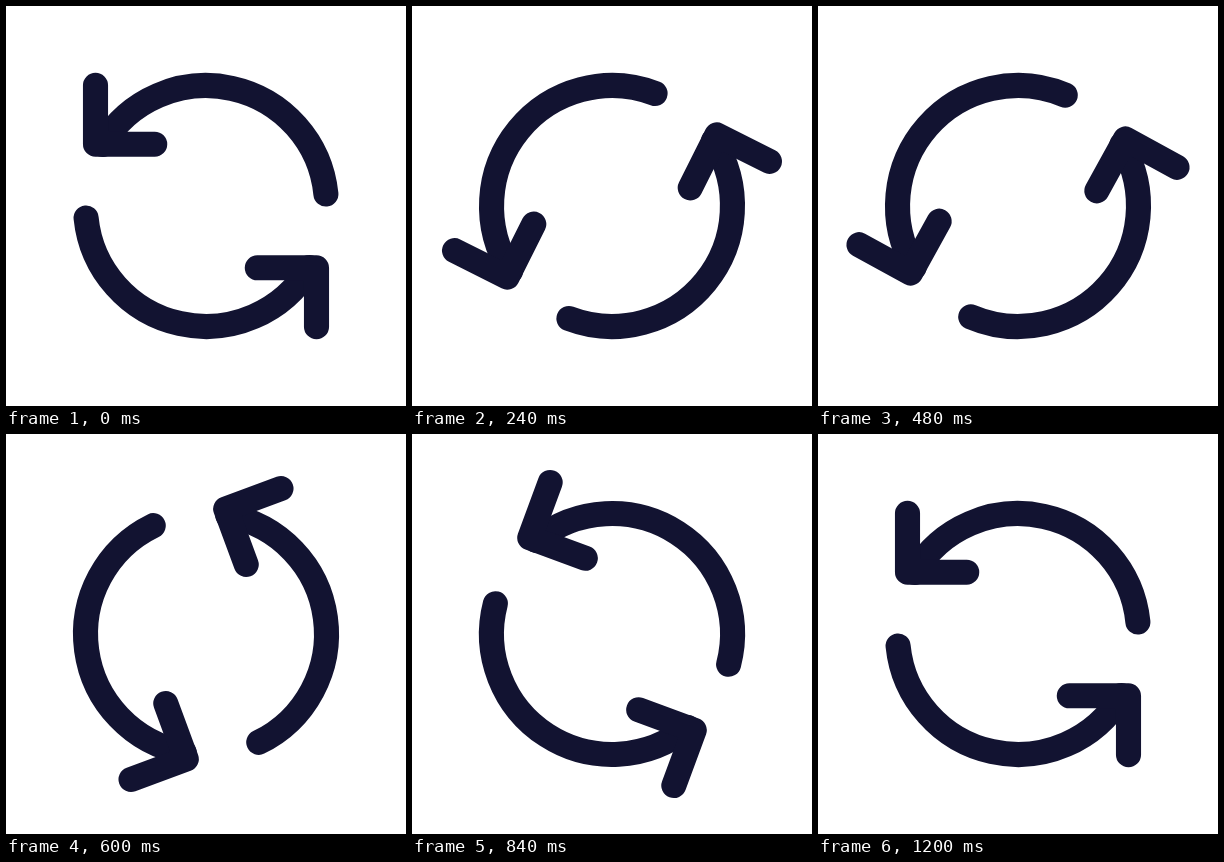
These frames come from a looping animation (400x400 px, 3.23 s). An HTML page:

```html
<!DOCTYPE html>
<html lang="en">
<head>
<meta charset="utf-8">
<title>Refresh arrows</title>
<style>
  html, body { margin: 0; width: 100%; height: 100%; overflow: hidden; background: #fff; }
  svg { display: block; width: 100%; height: 100%; }
  #spin { fill: none; stroke: #121331; stroke-width: 25.1; stroke-linecap: round; stroke-linejoin: round; }
</style>
</head>
<body>
<svg viewBox="-200 -200 400 400">
  <defs>
    <g id="arrow">
      <path d="M119.9 -12A120.5 120.5 0 0 0 -103.6 -61.5"/>
      <path d="M-110.5 -120.7V-61.8H-51.3"/>
    </g>
  </defs>
  <g id="spin">
    <use href="#arrow"/>
    <use href="#arrow" transform="rotate(180)"/>
  </g>
</svg>
<script>
  const LOOP = 3230, STEP = 30;
  const spin = document.getElementById('spin');

  // time in ms, counter-clockwise angle in degrees, speed in degrees per ms
  const keys = [
    [0, 0, 0],
    [240, 63.35, 0.675],
    [360, 163.4, 0.81],
    [480, 241.2, 0.516],
    [720, 320.6, 0.204],
    [960, 351.6, 0.083],
    [1200, 360, 0]
  ];

  function angleAt(t) {
    const i = keys.findIndex(k => k[0] > t);
    if (i < 0) return 360;
    const [t0, a0, v0] = keys[i - 1], [t1, a1, v1] = keys[i];
    const d = t1 - t0, s = (t - t0) / d, r = 1 - s;
    return r * r * ((1 + 2 * s) * a0 + s * d * v0)
         + s * s * ((1 + 2 * r) * a1 - r * d * v1);
  }

  const start = performance.now();

  function draw() {
    const t = (performance.now() - start) % LOOP;
    const held = Math.floor(t / STEP) * STEP;
    spin.setAttribute('transform', `rotate(${-angleAt(held)})`);
    requestAnimationFrame(draw);
  }
  draw();
</script>
</body>
</html>
```
